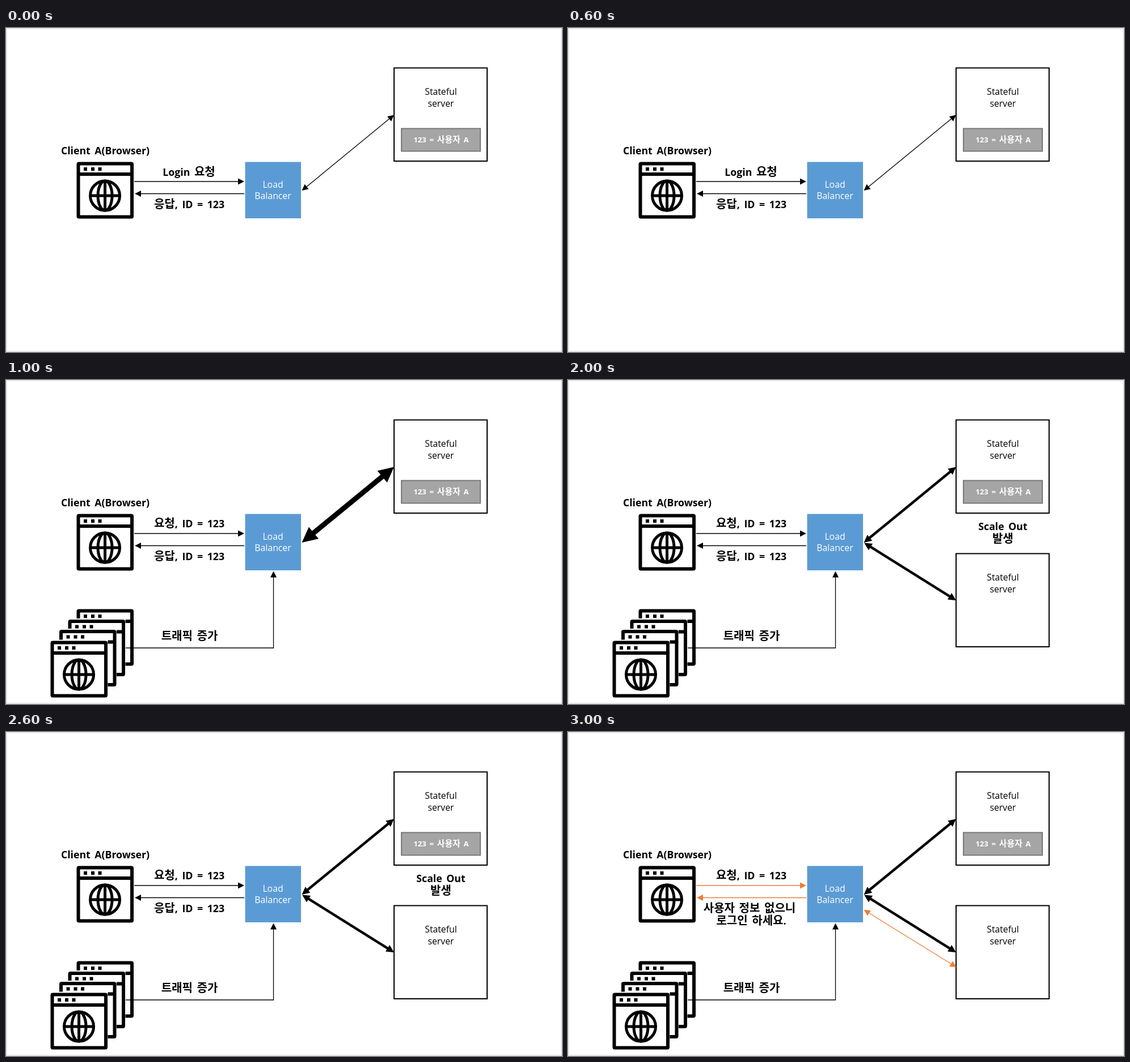
Recreate the animation shown at these times as an HTML page. Size 980 by 572 pixels, loop 4000 ms.

```html
<!DOCTYPE html>
<html lang="ko">
<head>
<meta charset="utf-8">
<title>Stateful server</title>
<style>
  html, body { margin: 0; height: 100%; overflow: hidden; background: #fff; }
  svg { display: block; width: 980px; height: 572px; }
  text { font: 15.8px "Open Sans", "Noto Sans CJK KR", "Noto Sans CJK", sans-serif; text-anchor: middle; }
  .bold { font-size: 17.7px; font-weight: 700; word-spacing: .17em; }
  .small { font-size: 13.2px; }
  .ko { font-family: "Noto Sans CJK KR", "Noto Sans CJK", sans-serif; font-size: 1.13em; }
</style>
</head>
<body>
<svg id="stage" viewBox="0 0 980 572">
  <defs>
    <g id="browser">
      <path d="M-2-2H101V101H-2Z" fill="#fff"/>
      <g fill="none" stroke="#000">
        <rect x="3" y="3" width="94.5" height="94" rx="1" stroke-width="6"/>
        <path d="M3 21.5H97" stroke-width="6"/>
        <path d="M12.5 12.5h6m7 0h6m6.500 0h6" stroke-width="6"/>
        <g stroke-width="5">
          <circle cx="50" cy="59.500" r="26"/>
          <ellipse cx="50" cy="59.500" rx="12.500" ry="26"/>
          <path d="M24 59.500H76M50 33.500V85.500"/>
        </g>
      </g>
    </g>
    <g id="server">
      <rect x="684" y="70.500" width="164" height="164.500" fill="#fff" stroke="#000" stroke-width="2"/>
      <text x="766.500" y="118">Stateful</text>
      <text x="766.500" y="138.500">server</text>
    </g>
  </defs>
  <rect x="1" y="1" width="978" height="570" fill="#fff" stroke="#e6e6e6" stroke-width="2"/>
  <use href="#browser" x="124.500" y="236.500"/>
  <use href="#server"/>
  <rect x="697" y="177.500" width="139" height="40" fill="#a5a5a5" stroke="#787878" stroke-width="2"/>
  <rect x="421.500" y="236.500" width="98.500" height="99.500" fill="#5b9bd5"/>
  <g fill="#fff">
    <text x="470.500" y="282">Load</text>
    <text x="470.500" y="302">Balancer</text>
  </g>
  <g id="labels"></g>
  <g id="scene"></g>
</svg>
<script>
const $ = id => document.getElementById(id);
const ORANGE = '#ed7d31';

// Hangul runs are set slightly larger than the Latin around them
const label = (x, y, text, cls = '', fill = '#000') =>
  `<text x="${x}" y="${y}" class="bold ${cls}" fill="${fill}">` +
  text.replace(/[가-힣]+/g, '<tspan class="ko">$&</tspan>') + '</text>';

const use = (id, x, y) => `<use href="#${id}" x="${x}" y="${y}"/>`;

// Line from a to b with a head at b, and also at a when both is set
function arrow([ax, ay], [bx, by], { width = 1.3, color = '#000', both = false } = {}) {
  const head = Math.max(11, width * 3);
  const length = Math.hypot(bx - ax, by - ay);
  const angle = Math.atan2(by - ay, bx - ax) * 180 / Math.PI;
  const tip = (x, dir) => `M${x} 0l${-dir * head} ${-head / 2}v${head}Z`;
  return `<g transform="translate(${ax} ${ay}) rotate(${angle})" fill="${color}">
    <path d="M${both ? head - 1 : 0} 0H${length - head + 1}" stroke="${color}" stroke-width="${width}"/>
    <path d="${tip(length, 1) + (both ? tip(0, -1) : '')}"/></g>`;
}

const calls = color =>
  arrow([226, 271], [420, 271], { color }) + arrow([420, 292.5], [227, 292.5], { color });
const link = (from, to, width, color) => arrow(from, to, { width, color, both: true });
const toFirst = width => link([521.5, 287], [684, 153.5], width);

const request = label(323, 260, '요청, ID = 123');
const reply = label(323, 318, '응답, ID = 123');
const traffic =
  [[124.5, 404.5], [109.5, 423], [94, 441], [78.5, 460.5]].map(p => use('browser', ...p)).join('') +
  '<path d="M211 473H471.500" stroke="#000" stroke-width="1.300"/>' +
  arrow([471.5, 473.6], [471.5, 337.5]) + label(323.5, 458.5, '트래픽 증가');
const second = use('server', 0, 236) + toFirst(4.5) + link([522, 287.5], [684, 389], 4.5);

const scenes = [
  calls() + label(322.5, 260.5, 'Login 요청') + reply + toFirst(),
  calls() + request + reply + traffic + toFirst(9),
  calls() + request + reply + traffic + second +
    label(766.5, 265, 'Scale Out') + label(766.5, 286.5, '발생'),
  calls(ORANGE) + request + label(320, 318, '사용자 정보 없으니') +
    label(323, 340, '로그인 하세요.') + traffic + second +
    link([521.5, 314], [684.5, 415], 1.3, ORANGE)
];

$('labels').innerHTML = label(175, 223, 'Client A(Browser)') +
  label(767, 201.5, '123 = 사용자 A', 'small', '#fff');

let shown = -1;
function draw() {
  const step = Math.floor(performance.now() / 1000) % scenes.length;
  if (step !== shown) $('scene').innerHTML = scenes[shown = step];
  requestAnimationFrame(draw);
}
draw();
</script>
</body>
</html>
```
